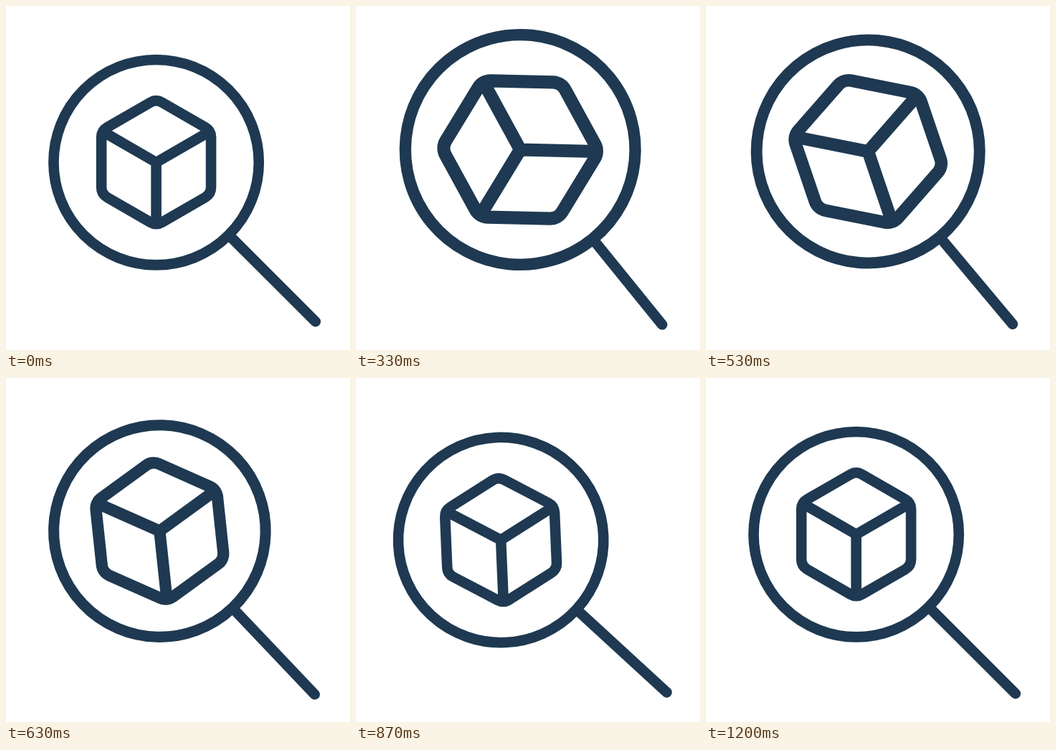
Write an HTML page that moves like this. It is 480 px wide and 480 px high and loops after 1530 ms.

```html
<!DOCTYPE html>
<html lang="en">
<head>
<meta charset="utf-8">
<title>Magnifier and cube</title>
<style>
  html, body { margin: 0; width: 100%; height: 100%; overflow: hidden; background: #fff; }
  svg { display: block; width: 100%; height: 100%; }
  g { fill: none; stroke: #1e3951; stroke-width: 14.6; }
</style>
</head>
<body>
<svg viewBox="0 0 480 480">
  <g id="tool">
    <line id="handle" stroke-linecap="round"/>
    <g id="lens"><circle r="143.2"/></g>
    <g id="cube"><path id="box"/></g>
  </g>
</svg>
<script>
const LOOP = 1530, MOVE_END = 1200;
const PEAK = 400;                  // lens and cube are largest
const CX = 209.6, CY = 218.2;      // lens centre at rest
const PIVOT = '390 398';
const HANDLE_END = 314.3;          // distance from the lens centre
const $ = id => document.getElementById(id);

// Progress from time a to time b, eased at both ends;
// skew below 1 hurries the start, above 1 delays it.
function ease(t, a, b, skew = 1) {
  const u = Math.min(1, Math.max(0, (t - a) / (b - a))) ** skew;
  return u * u * (3 - 2 * u);
}

// Tilts forward, swings back past rest, overshoots slightly and settles.
const swing = t => 6.15 * ease(t, 0, PEAK, .636)
  - 10.15 * ease(t, PEAK, 785, 1.5)
  + 5.25 * ease(t, 785, 1075, .8)
  - 1.25 * ease(t, 1075, MOVE_END);

const lensScale = t => 1 + .124 * (ease(t, 0, PEAK, .62) - ease(t, PEAK, 740, 1.08));
const cubeScale = t => 1 + .26 * (ease(t, 0, PEAK, .9) - ease(t, PEAK, 800, 1.14));

// One full turn, slowing down all the way.
const spin = t => 360 * (1 - Math.max(0, 1 - t / 805) ** 2.5);

// Hexagon with rounded corners plus the three inner edges.
function cubePath(R, r) {
  const corner = k => {
    const a = (k * 60 - 90) * Math.PI / 180;
    return [R * Math.cos(a), R * Math.sin(a)];
  };
  const cut = r * Math.tan(Math.PI / 6) / R;
  const toward = (p, q) => p.map((v, i) => (v + (q[i] - v) * cut).toFixed(2)).join(' ');
  let d = '';
  for (let k = 0; k < 6; k++) {
    const p = corner(k);
    d += `${k ? 'L' : 'M'}${toward(p, corner(k - 1))}A${r} ${r} 0 0 1 ${toward(p, corner(k + 1))}`;
  }
  d += 'Z';
  for (let k = 1; k < 6; k += 2) {
    d += `M0 0L${corner(k).map(v => (v * .965).toFixed(2)).join(' ')}`;
  }
  return d;
}

// Point on the handle's diagonal, measured from the lens centre.
const along = d => [CX + d * Math.SQRT1_2, CY + d * Math.SQRT1_2];

function setLine(el, [x1, y1], [x2, y2]) {
  for (const [k, v] of Object.entries({ x1, y1, x2, y2 })) el.setAttribute(k, v);
}

function draw(ms) {
  // 30 poses per second on a 10 ms clock
  const step = Math.floor((Math.floor(ms / 10) * 3 + 1) / 10);
  const t = Math.min(step * 100 / 3, MOVE_END);
  const size = cubeScale(t);
  $('tool').setAttribute('transform', `rotate(${swing(t)} ${PIVOT})`);
  $('lens').setAttribute('transform', `translate(${CX} ${CY}) scale(${lensScale(t)})`);
  $('cube').setAttribute('transform', `translate(${CX} ${CY}) rotate(${spin(t)}) scale(${size})`);
  setLine($('handle'), along(145 + 90 * (size - 1)), along(HANDLE_END));
}

$('box').setAttribute('d', cubePath(88.3, 16));

const start = performance.now();
function tick() {
  draw((performance.now() - start) % LOOP);
  requestAnimationFrame(tick);
}
tick();
</script>
</body>
</html>
```
